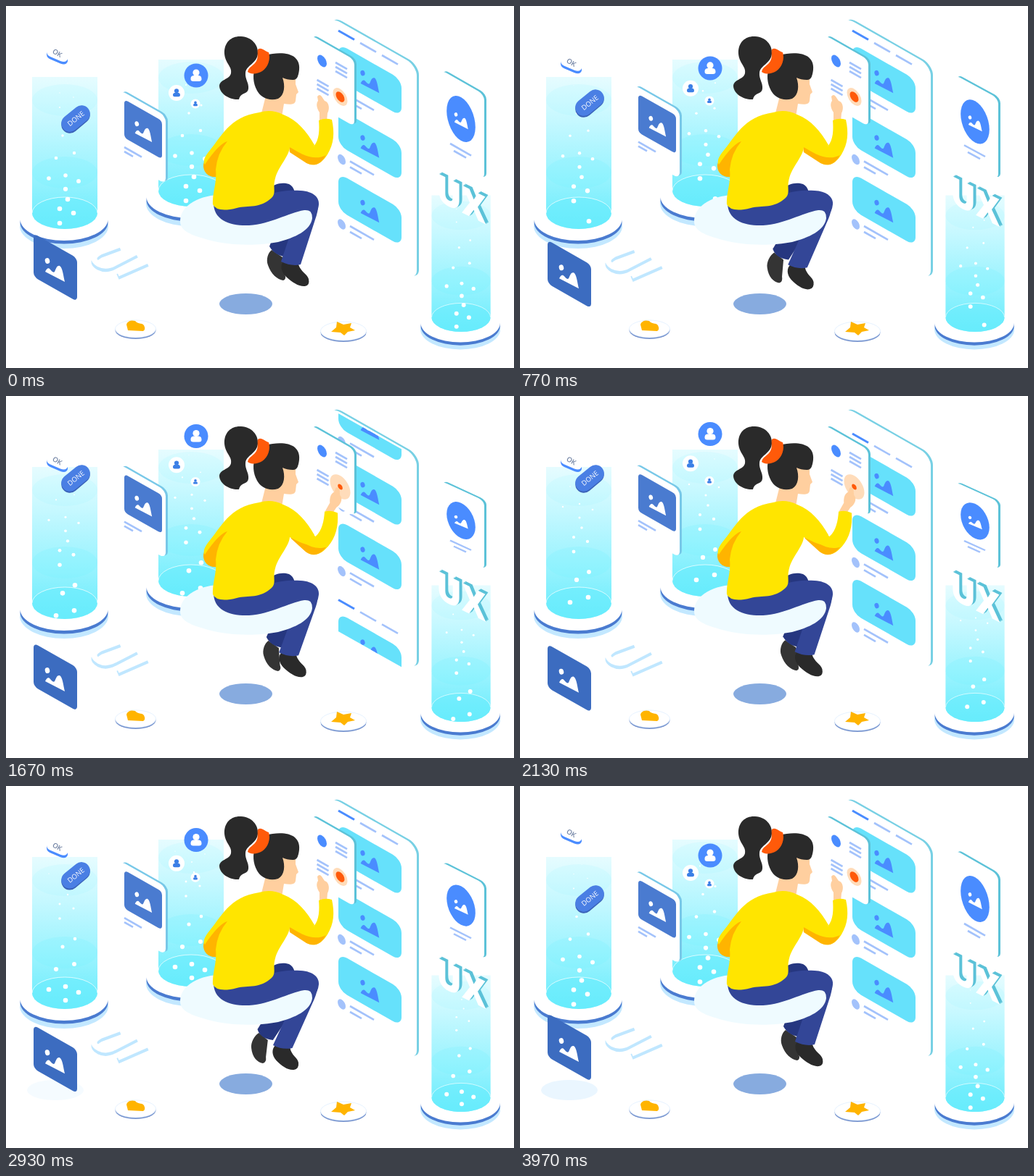
An HTML page that plays this animation: 700 px wide and 500 px high, repeating every 4.01 s.

```html
<!DOCTYPE html>
<html lang="en">
<head>
<meta charset="utf-8">
<title>Interface studio</title>
<style>
html, body { margin: 0; width: 100%; height: 100%; overflow: hidden; background: #fff; }
svg { display: block; width: 100vw; height: 100vh; }
text { font-family: "Open Sans", sans-serif; }
</style>
</head>
<body>
<svg id="stage" viewBox="0 0 700 500" stroke-linecap="butt"></svg>
<script>
const LOOP = 4010, SLOPE = 0.57, BUBBLE_CYCLE = 160, LIST_CYCLE = 307;
const BLUE = '#4a8cff', PALE = '#a3c2fb', TEAL = '#5cc2d8', INK = '#2a2a2a';
const YELLOW = '#ffe500', AMBER = '#ffb400', SKIN = '#ffcf9f', NAVY = '#334697';
const bubbles = [[74,300],[93,286],[74,280],[85,267],[82,253],[59,238],[82,234],
  [100,242],[69,210],[94,203],[78,179],[95,168]];

// Shape helpers
const path = (d, fill, extra = '') => `<path d="${d}" fill="${fill}" ${extra}/>`;
const oval = (x, y, rx, ry, fill, extra = '') =>
  `<ellipse cx="${x}" cy="${y}" rx="${rx}" ry="${ry}" fill="${fill}" ${extra}/>`;
const group = (id, body, extra = '') => `<g id="${id}" ${extra}>${body}</g>`;
const iso = (x, y) => `transform="matrix(1 ${SLOPE} 0 1 ${x} ${y})"`;
const panel = (x, y, w, h, r, fill) =>
  `<rect width="${w}" height="${h}" rx="${r}" fill="${fill}" ${iso(x, y)}/>`;
const slab = (x, y, w, h, r, side) =>
  panel(x + 3, y - 1, w, h, r, side) + panel(x, y, w, h, r, '#fff');
const isoOval = (x, y, rx, ry, fill) => oval(0, 0, rx, ry, fill, iso(x, y));
const bar = (x, y, w, color = PALE, weight = 2.6) =>
  `<path d="M${x} ${y}l${w} ${w * SLOPE}" stroke="${color}" stroke-width="${weight}"/>`;
const picture = (x, y, k, fill) => `<g transform="translate(${x} ${y}) scale(${k})" fill="${fill}">
  <ellipse cx="-10" cy="-13" rx="3.2" ry="4" transform="rotate(-15 -10 -13)"/>
  <path d="M-13 2C-11-3-8-4-6-1C-4 1-2 4 0 2C2-2 3-7 7-6C11-4 12 8 14 16Z"/></g>`;
const user = (id, x, y, r, disc, fill) => group(id, `<g transform="translate(${x} ${y}) scale(${r / 16.5})">
  <circle r="16.5" fill="${disc}"/><circle cy="-4" r="4.6" fill="${fill}"/>
  <path d="M-7.5 5C-7.5-1-3 0 0 0S7.5-1 7.5 5Q7.5 8 4 8H-4Q-7.5 8-7.5 5Z" fill="${fill}"/></g>`);

function tube(id, top, place) {
  const wall = `M36 ${top}H126V286A45 22 0 0 1 36 286Z`;
  return `<g transform="${place}">
    ${oval(80, 304, 61, 31, '#c3e8ff')}${oval(80, 299, 60.5, 29.5, '#4a7bd0')}${oval(80, 294.5, 60.5, 29.5, '#fff')}
    ${path(wall, 'url(#water)')}
    ${oval(81, 130, 45, 22, '#8ff0ff', 'opacity=".13"')}
    ${oval(81, 230, 45, 22, '#6eeeff', 'opacity=".2"')}
    ${oval(81, 286, 45, 22, '#66edfd', 'opacity=".55"')}
    <path d="M36 286A45 22 0 0 1 126 286" fill="none" stroke="#fff" opacity=".7"/>
    <g id="${id}" fill="#fff">${bubbles.map(() => '<circle/><circle/>').join('')}</g></g>`;
}

function feed(y) {
  const row = top => panel(458, top, 87, 51, 12, '#66e1fb') + picture(501, top + 53, .95, BLUE) +
    isoOval(462.5, top + 70.5, 5.5, 6.5, PALE) + bar(474, top + 73, 33) + bar(474, top + 81, 16);
  return `<g transform="translate(0 ${y})">${bar(458, 34, 22, BLUE, 3)}${bar(488, 51, 22)}${bar(518, 68, 22)}
    ${[52, 141.5, 231].map(row).join('')}</g>`;
}

const coaster = (x, y, rx, ry) => oval(x, y + 2, rx, ry, '#7592cd') + oval(x, y, rx, ry, '#fff') +
  oval(x, y, rx, ry, 'none', 'stroke="#dcecff" stroke-width=".7"');

const uxText = (dx, dy, fill) =>
  `<text font-size="53" font-weight="800" fill="${fill}" transform="matrix(.87 .43 0 1 ${593 + dx} ${268 + dy})">UX</text>`;
const uiPath = 'M157 334L130 344Q114 353 128 361Q138 366 149 360L180 344M154 374L195 356';
const uiStroke = (dy, color) =>
  `<path d="${uiPath}" fill="none" stroke="${color}" stroke-width="8" transform="translate(0 ${dy})"/>`;
const okPath = 'M56 63Q56 55 63 58L80 66Q86 69 85 73Q83 79 75 76L61 70Q56 68 56 63Z';

const defs = `<defs>
  <linearGradient id="water" x1="0" y1="0" x2="0" y2="1"><stop stop-color="#e6fcff"/>
    <stop offset=".3" stop-color="#c4f8ff"/><stop offset=".7" stop-color="#93f2fe"/><stop offset="1" stop-color="#68ecfc"/></linearGradient>
  <clipPath id="screen"><path d="M456 23L548 75V376L456 324Z"/></clipPath></defs>`;

const leftSide =
  tube('bubblesA', 98, '') + tube('bubblesB', 105, 'translate(174 -31)') +
  group('ok', path(okPath, BLUE, 'transform="translate(0 3.5)"') + path(okPath, '#fff') +
    `<text font-size="9.5" font-weight="600" fill="#7284a5" text-anchor="middle" transform="translate(69 68) rotate(30)">OK</text>`) +
  group('done', `<g stroke-linecap="round" stroke-width="23.5"><path d="M88 164L104 150.5" stroke="#3a62b8"/>
    <path d="M88 162L104 149" stroke="#4a7fe4"/></g>
    <text font-size="9.5" fill="#fff" text-anchor="middle" transform="translate(98.5 158) rotate(-39)">DONE</text>`) +
  user('userBig', 262, 96, 16.5, BLUE, '#fff') + user('userMid', 235, 120, 11, '#fff', '#3b7fe6') +
  user('userSmall', 261, 135, 6.5, '#fff', '#3b7fe6') +
  group('photoCard', slab(157, 116, 63, 94, 8, '#78c8e8') + panel(163, 129, 52, 53, 5, '#4a7bd0') +
    picture(189, 174, .87, '#fff') + bar(163, 195, 24) + bar(163, 201, 12)) +
  oval(68, 420, 39, 14, '#eaf6ff', 'id="tileShade"') +
  group('tile', panel(38, 314, 60, 60, 6, '#3c6cc0') + picture(67, 365, 1, '#fff')) +
  group('ui', uiStroke(0, '#c0e7ff') + uiStroke(-4.5, '#fff')) +
  coaster(178.5, 446, 28, 12) + path('M166 440C168 434 174 434 178 435C182 440 187 437 190 441Q193 447 189 449L168 448Z', AMBER) +
  coaster(465, 449, 31.5, 13) + path('M456 436L465 440L476 438L474 444L481 448L471 450L466 455L461 451L448 450L455 444Z', AMBER);

const rightSide =
  slab(446, 14, 120, 297, 14, '#78d0e4') +
  `<g clip-path="url(#screen)">${group('list', feed(0) + feed(LIST_CYCLE))}</g>` +
  slab(420, 40, 60, 92, 7, TEAL) + isoOval(435.5, 76, 6.5, 7.5, BLUE) +
  [78, 84, 90].map(y => bar(454, y, 16)).join('') + [102, 108, 114].map(y => bar(428.5, y, 16)).join('') +
  group('halo', oval(0, 0, 10, 11, '#ffdcba', iso(460.5, 125.5))) +
  group('dot', oval(0, 0, 6, 6.5, '#ff5a0a', iso(460.5, 125.5))) +
  tube('bubblesC', 99, 'translate(553.9 172) scale(.903)') +
  group('profile', slab(599, 88, 60, 118, 8, TEAL) + isoOval(627, 156, 19.8, 30, BLUE) +
    picture(627, 159, .7, '#fff') + bar(612, 190, 29) + bar(617, 200, 17)) +
  group('ux', [4, 3, 2, 1].map(k => uxText(k, -k * .6, TEAL)).join('') + uxText(0, 0, '#fff'));

const woman =
  oval(330.5, 411.5, 36.5, 14.5, '#87abdf') +
  path('M350 262C368 244 380 243 390 246Q398 250 398 262L360 275Z', '#263780') +
  group('rearLeg', path('M366 337C361 341 358 350 361 358C365 370 374 378 382 379Q387 378 384 370L381 347Z', '#343434') +
    path('M375 300L363 332Q370 345 388 347L412 290Z', '#263780')) +
  group('frontLeg', path('M383 352C377 358 379 367 386 374C395 382 404 388 412 387Q419 386 417 377C415 370 406 367 403 357Z', INK) +
    path('M395 276L430.500 274Q430 284 426 295L406 357Q393 360 379 353L395 305Z', NAVY)) +
  path('M240 296C241 276 265 262 293 261L410 282Q422 279 422 293C420 310 398 320 375 326C345 332 300 331 272 321C250 315 239 308 240 296Z', '#effbff') +
  path('M286 270L350 266C370 255 390 254 406 255C424 256 432 265 431 274Q430 284 424 290Q421 281 411 282C388 286 365 301 335 303C310 304 285 297 286 270Z', NAVY) +
  path('M357 128L351 152Q365 160 380 153L383 135C390 136 398 137 399 131L400 122L403 119L399 108V98L370 95Z', SKIN) +
  path('M306 184C288 190 274 208 272 219C271 230 280 238 292 236Z', AMBER) +
  group('arm', group('hand', path('M432 160V147C428 141 427 135 430 131L429 125Q432 121 435 125L439 131C446 133 446 143 443 148L442 160Z', SKIN)) +
    path('M431 158Q440 154 449 157C453 175 452 190 443 205C436 216 427 223 415 217L391 196L405 185L424 194C432 185 432 170 431 158Z', YELLOW) +
    path('M390 194C405 204 424 215 441 206C435 217 426 223 414 217L391 202Z', AMBER)) +
  path('M349 147Q366 142 382 150C402 158 414 173 425 192L420 206C410 205 399 199 391 195C390 208 375 222 371 238C367 251 373 258 366 265C350 280 334 275 318 279Q291 286 285 274C284 258 291 244 289 226Q291 203 305 187C294 190 280 210 274 219Q270 214 278 203C297 181 307 153 349 147Z', YELLOW) +
  path('M301 66C300 49 312 41 324 42C339 43 348 54 347 66C346 79 331 82 330 92C329 101 335 106 334 114C333 123 324 118 321 129C309 130 295 122 294 111C294 101 308 102 310 93C312 84 302 79 301 66Z', INK) +
  path('M358 68C372 64 390 64 398 71C405 77 405 86 403 94Q401 103 395 102Q387 102 381 99C385 110 384 123 375 128C362 132 351 126 346 117C340 106 340 94 343 86Z', INK) +
  path('M347 60C352 56 357 63 362 64C365 73 361 85 353 90C346 94 339 95 333 91C334 84 342 82 345 76C348 70 346 65 347 60Z', '#ff5a0a');

const stage = document.getElementById('stage');
stage.innerHTML = defs + leftSide + rightSide + woman;
const parts = Object.fromEntries([...stage.querySelectorAll('[id]')].map(el => [el.id, el]));

// Timing helpers, in seconds
const ease = (t, from, to) => (1 - Math.cos(Math.PI * Math.min(1, Math.max(0, (t - from) / (to - from))))) / 2;
const pulse = (t, a, b, c, d) => ease(t, a, b) - ease(t, c, d);
const wave = (t, period) => (1 - Math.cos(2 * Math.PI * t / period)) / 2;
const set = (id, transform) => parts[id].setAttribute('transform', transform);
const lift = (id, dy) => set(id, `translate(0 ${dy})`);
const grow = (id, k) => set(id, `translate(460.5 125.5) scale(${k}) translate(-460.5 -125.5)`);
const swing = (id, lean, drop, pivot) =>
  set(id, `matrix(1 0 ${-lean} 1 ${lean * pivot} ${drop})`);

function riseBubbles(id, t) {
  const dots = parts[id].children;
  const travel = t * 1000 / LOOP * BUBBLE_CYCLE;
  bubbles.forEach(([x, start], i) => {
    const y = 145 + (start - 145 - travel + 2 * BUBBLE_CYCLE) % BUBBLE_CYCLE;
    [y, y - BUBBLE_CYCLE].forEach((cy, j) => {
      const dot = dots[i * 2 + j];
      dot.setAttribute('cx', x);
      dot.setAttribute('cy', cy);
      dot.setAttribute('r', cy < 106 ? 0 : Math.min(3.3, (cy - 85) / 54));
    });
  });
}

function draw(t) {
  const drift = wave(t, LOOP / 1000), kick = wave(t, LOOP / 2000);
  const buttons = pulse(t, 0, 1.5, 2.42, 4.01);
  const people = pulse(t, .2, 2, 2, 3.83);
  const squash = pulse(t, .25, 1.9, 2.1, 3.85);
  const press = pulse(t, 1, 1.5, 2.2, 2.7);

  ['bubblesA', 'bubblesB', 'bubblesC'].forEach(id => riseBubbles(id, t));
  lift('ok', 24.5 * buttons);
  lift('done', -42 * buttons);
  lift('userBig', -44 * people);
  lift('userMid', -27 * people);
  lift('userSmall', -18 * people);
  lift('photoCard', -23 * drift);
  lift('tile', 29 * drift);
  lift('ux', 11 * drift);
  lift('ui', 10 * drift);
  parts.tileShade.setAttribute('opacity', ease(t, 2.4, 3.5));
  set('profile', `matrix(1 0 0 ${1 - .2 * squash} 0 ${48 * squash})`);
  lift('list', -LIST_CYCLE * ease(t, 1.43, 2.26));
  grow('halo', 1 + .4 * press);
  grow('dot', 1 - .45 * press);
  set('arm', `rotate(${9 * press} 425 210)`);
  set('hand', `rotate(${20 * press} 440 158)`);
  swing('frontLeg', .127 * kick, 5 * kick, 265);
  swing('rearLeg', .25 * kick, 4 * kick, 265);
}

const begin = performance.now();
function tick() {
  draw((performance.now() - begin) % LOOP / 1000);
  requestAnimationFrame(tick);
}
tick();
</script>
</body>
</html>
```
